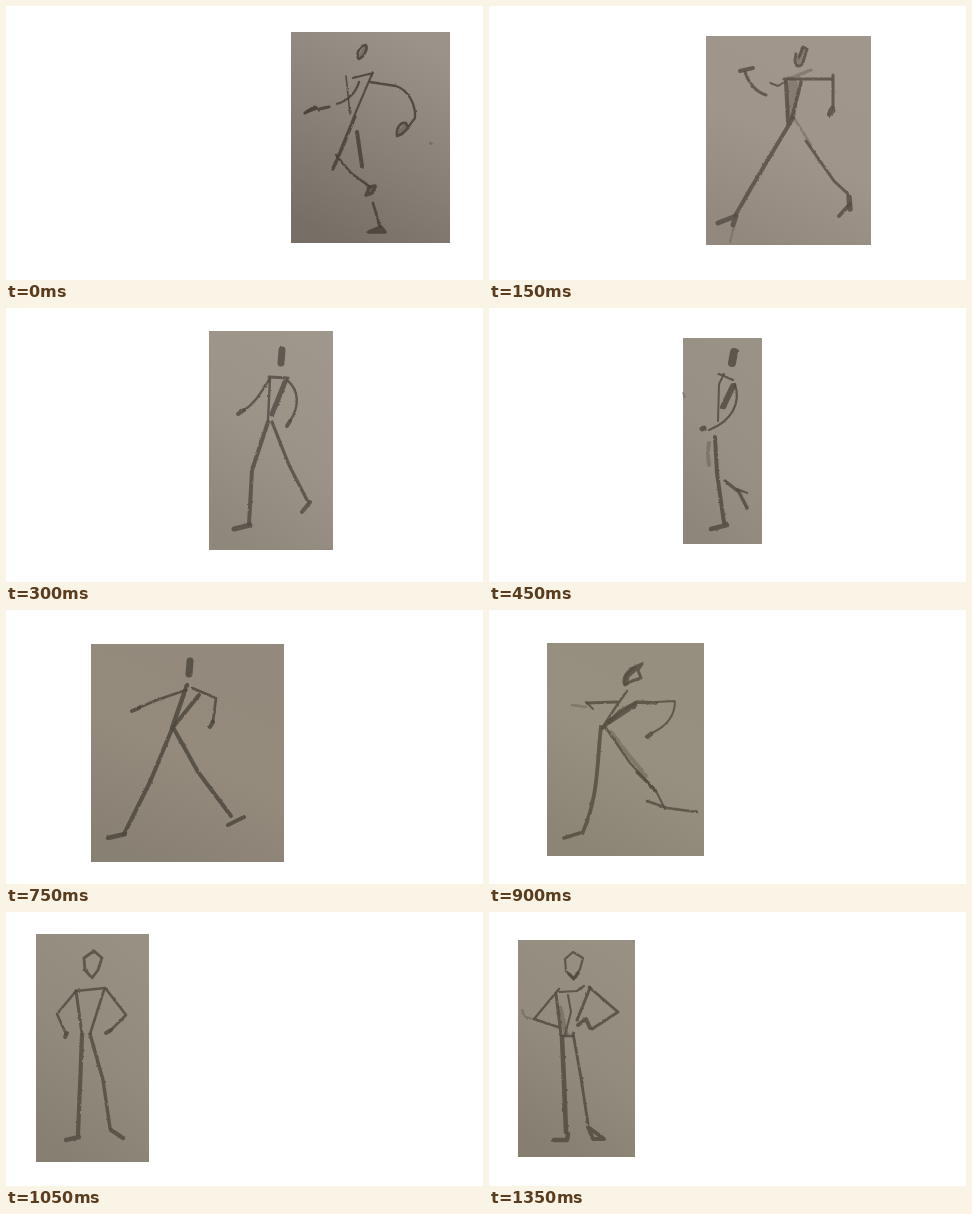
These frames come from a looping animation (477x274 px, 2350 ms). An HTML page:

```html
<!DOCTYPE html>
<html lang="en">
<head>
<meta charset="utf-8">
<title>Walking sketch</title>
<style>
html, body { margin: 0; width: 100%; height: 100%; overflow: hidden; background: #fff; }
svg { display: block; width: 100%; height: 100%; }
</style>
</head>
<body>
<svg id="stage" viewBox="0 0 477 274" xmlns="http://www.w3.org/2000/svg">
  <defs>
    <filter id="pencil" filterUnits="userSpaceOnUse" x="0" y="0" width="477" height="274" color-interpolation-filters="sRGB">
      <feTurbulence type="fractalNoise" baseFrequency="0.25" numOctaves="2" seed="4" result="grain"/>
      <feDisplacementMap in="SourceGraphic" in2="grain" scale="2.2" xChannelSelector="R" yChannelSelector="G"/>
      <feGaussianBlur stdDeviation="0.5"/>
    </filter>
  </defs>
</svg>
<script>
const NS = 'http://www.w3.org/2000/svg';
const LOOP = 2350;
const stage = document.getElementById('stage');
const defs = stage.querySelector('defs');

// Each stroke is "width path"; a leading "~" draws it faintly.
const poses = [
  { at: 0, box: [285, 26, 444, 237], paper: ['#9b9289', '#8a8178', '#776e65'], ink: '#453e37', strokes: [
    '2.6 M352 52C350 46 355 39 360 39C362 43 358 51 353 53Z', '~3 M354 50L359 41',
    '2.2 M347 72L367 67', '2 M366 68L349 108', '3.6 M349 110L338 137L327 163',
    '1.6 M340 70L344 108', '2.4 M353 76C350 87 341 95 331 98',
    '3.2 M299 107L308 101L313 103L323 101', '3 M300 106L309 103',
    '2.3 M364 76L390 80C402 84 410 98 409 112L403 120',
    '2.6 M391 130C390 122 394 116 400 117L402 122L396 128Z', '~4 M394 126L399 120',
    '4 M351 126L356 160', '2.4 M330 149L345 167L364 181',
    '3.6 M360 189L364 181L369 180L366 187Z',
    '2.8 M367 197L374 221', '3.6 M363 226L375 221L379 226Z', '~2 M424 137L426 138'] },

  { at: 150, box: [217, 30, 382, 239], paper: ['#a0968b', '#9f958b', '#92887e'], ink: '#564e46', strokes: [
    '3 M307 48L306 55C307 62 312 61 314 56L318 43L314 41L310 51', '~4 M310 56L314 44',
    '4 M251 65L264 62', '3 M256 66C260 78 268 86 277 89',
    '2 M281 77L289 80L297 75', '3 M295 73L342 73', '3 M344 69L344 101', '6 M341 108L343 103',
    '4 M297 76L299 116', '3.6 M312 76L303 112', '~10 M304 78L302 108', '~3 M299 73L322 64',
    '4 M304 112L262 182L246 210', '5 M229 217L247 210L244 219', '~2 M245 220L241 236',
    '~2.4 M304 110L322 139', '3 M317 135L345 175L359 188', '5.5 M360 191L361 203', '4 M350 210L361 198'] },

  { at: 300, box: [203, 23, 327, 242], paper: ['#9f968c', '#9b9288', '#8f867c'], ink: '#534c44', strokes: [
    '7 M276 42L275 55', '3 M263 69L282 70', '2.4 M264 70L262 112', '5 M279 74L266 106',
    '2.4 M263 72C254 86 248 96 238 102', '4 M232 106L238 102',
    '2.4 M281 72C293 82 294 98 284 113', '4 M281 118L284 113',
    '4 M262 114L246 162L243 216', '5 M228 221L244 217',
    '3.2 M266 114L283 157L302 194', '4 M296 204L304 194'] },

  { at: 450, box: [194, 30, 273, 236], paper: ['#9b9287', '#999085', '#8f867b'], ink: '#50493f', strokes: [
    '8 M245 44L243 55', '2.4 M230 66L244 72', '2 M235 66L230 76L229 113', '6 M244 78L234 99',
    '2.2 M246 76C252 95 243 113 220 122', '5 M213 121L215 120',
    '~4 M220 135C218 145 219 151 220 157', '4 M226 129L228 165L235 215', '4.5 M222 221L238 217',
    '3.4 M236 173L250 184L258 200', '2.4 M248 181L258 185', '~2 M194 85L196 89'] },

  { at: 600, box: [121, 28, 259, 243], paper: ['#8d8477', '#8f8679', '#82796c'], ink: '#443e35', strokes: [
    '8 M214 49L215 60', '4 M211 46L221 44', '4.6 M219 69C208 80 203 92 204 107',
    '4 M226 82C216 92 208 98 205 112', '2.6 M206 96L183 103', '4 M162 108L171 105',
    '2.6 M225 72C237 77 244 90 242 107', '3 M243 125L240 142', '3 M200 111L211 117',
    '3.2 M201 118L175 150L146 182', '4 M137 186L141 191',
    '4.8 M208 115C218 145 222 180 231 215', '5 M218 220L238 218', '~4 M213 229L230 226'] },

  { at: 750, box: [85, 34, 278, 252], paper: ['#93897c', '#948b7d', '#888073'], ink: '#4c463c', strokes: [
    '7 M184 51L183 64', '4.5 M181 75L166 118', '4 M193 85L168 116',
    '2.8 M180 80L151 90L132 98', '4 M126 101L133 98',
    '2.6 M186 78L210 88L207 112', '4 M204 117L207 112',
    '4 M166 119L144 172L118 224', '4.5 M102 228L119 224',
    '4 M168 119L192 162L225 206', '4 M222 215L238 207'] },

  { at: 900, box: [58, 33, 215, 246], paper: ['#968f80', '#979081', '#8c8576'], ink: '#534d41', strokes: [
    '3 M135 73C134 64 142 58 153 54L149 60L152 68L143 71L136 75Z', '5 M137 73L138 66L146 59',
    '3.2 M98 93L128 92', '~2.4 M83 95L97 97', '2 M97 92L104 99',
    '2.4 M138 81L128 95L113 118', '3.6 M167 93L148 92L131 101L114 118', '4.6 M146 95L120 112',
    '2 M167 92L186 91C186 105 178 116 163 123', '4.5 M158 127L162 124',
    '3.8 M112 117C108 150 110 185 94 222', '3.6 M75 228L91 223',
    '2.4 M117 118L141 153L167 181', '~4 M122 122L138 143L157 166', '3.2 M148 162L166 180',
    '2 M167 181L176 199', '2.4 M158 191L178 198L208 202'] },

  { at: 1050, box: [30, 22, 143, 250], paper: ['#979083', '#928b7d', '#878072'], ink: '#514b41', strokes: [
    '2.8 M78 46L88 39L96 46L92 58L86 66L79 58Z', '2.4 M70 79L99 76',
    '3 M70 79L76 122', '2.6 M98 78L84 122', '2.6 M70 79L51 102L60 122', '4 M59 125L61 121',
    '2.6 M100 77L120 103L104 119', '4 M100 121L105 118',
    '4.2 M76 123L74 174L72 222', '4.5 M60 228L73 225',
    '3.4 M84 122L97 168L104 216', '4.5 M105 218L117 226'] },

  { at: 1350, box: [29, 28, 146, 245], paper: ['#979083', '#928b7e', '#857e71'], ink: '#504a40', strokes: [
    '2.2 M76 47L84 40L94 46L91 57L85 67L77 59Z', '3.4 M80 62L85 67L89 61',
    '2.2 M70 80L88 79L95 74', '2.4 M70 77L45 107L69 115', '~2 M33 98L36 105L45 107',
    '3 M67 82L72 123', '2 M79 83L82 100L76 123', '~5 M71 96L77 122',
    '2.8 M100 75L129 100L103 117', '3 M101 76L88 108', '4 M89 113L97 107L101 116', '2.6 M72 124L84 124',
    '4.6 M73 125L75 170L77 220', '4.5 M65 228L78 228L79 222',
    '2.8 M84 121L92 166L99 212', '4 M99 215L115 227L104 227Z'] }
];

function add(parent, tag, attrs) {
  const el = document.createElementNS(NS, tag);
  for (const key in attrs) el.setAttribute(key, attrs[key]);
  return parent.appendChild(el);
}

function build({ box: [x0, y0, x1, y1], paper, ink, strokes }, i) {
  const shade = add(defs, 'linearGradient', { id: 'paper' + i, x1: 0.7, y1: 0, x2: 0.3, y2: 1 });
  paper.forEach((color, k) => add(shade, 'stop', { offset: k / 2, 'stop-color': color }));

  const group = add(stage, 'g', { visibility: 'hidden' });
  add(group, 'rect', { x: x0, y: y0, width: x1 - x0, height: y1 - y0, fill: `url(#paper${i})` });
  const lines = add(group, 'g', {
    fill: 'none', stroke: ink, 'stroke-linecap': 'round', 'stroke-linejoin': 'round', filter: 'url(#pencil)'
  });
  for (const stroke of strokes) {
    const [, faint, width, d] = stroke.match(/^(~?)([\d.]+) (.*)$/);
    add(lines, 'path', { d, 'stroke-width': width, opacity: faint ? 0.35 : 0.82 });
  }
  return group;
}

const groups = poses.map(build);

function render(ms) {
  const t = ms % LOOP;
  const current = poses.filter(p => p.at <= t).length - 1;
  groups.forEach((g, i) => g.setAttribute('visibility', i === current ? 'visible' : 'hidden'));
}

const start = performance.now();
function tick() {
  render(performance.now() - start);
  requestAnimationFrame(tick);
}
tick();
</script>
</body>
</html>
```
